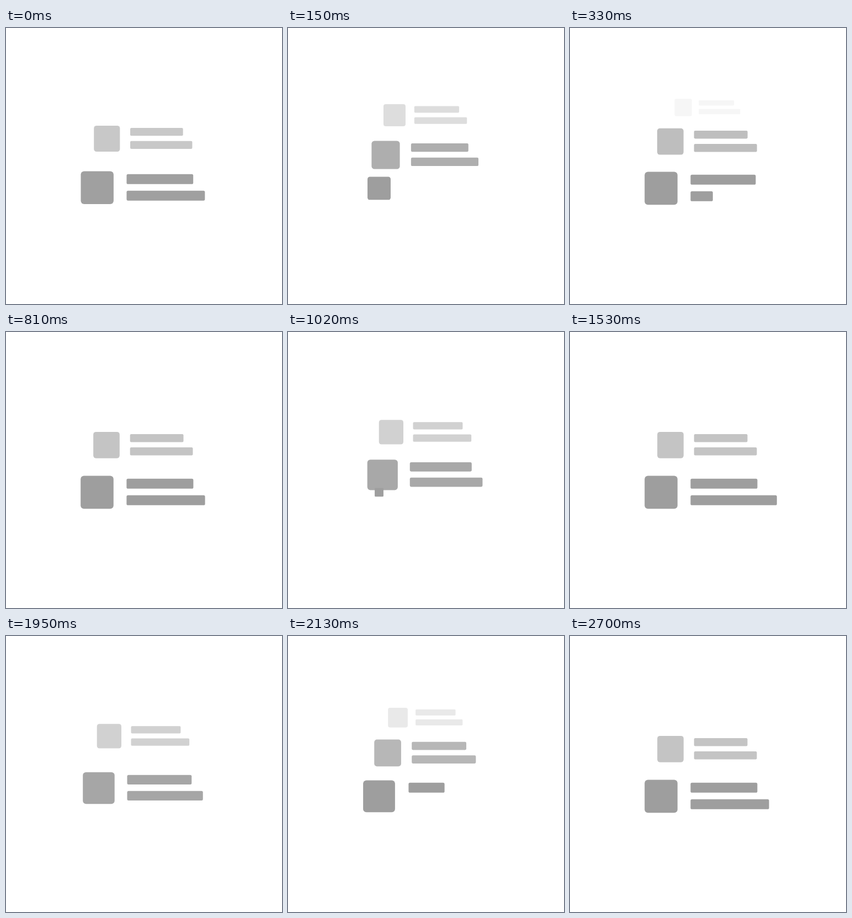
An HTML page that plays this animation: 500 by 500 pixels, repeating every 2.73 s.

```html
<!DOCTYPE html>
<html lang="en">
<head>
<meta charset="utf-8">
<title>List loader</title>
<style>
  html, body { margin: 0; width: 100%; height: 100%; overflow: hidden; background: #fff; }
  svg { display: block; width: 100%; height: 100%; }
</style>
</head>
<body>
<svg id="stage" viewBox="0 0 500 500" fill="#9e9e9e"></svg>
<script>
const LOOP = 2730, STEP = 30, MOVE = 420;
const CX = 250, FRONT_Y = 290.4, MID_Y = 204.8, BACK_Y = 143.3;
const SIZE = 59.6, BAR_X = -31.6, BAR1 = 121, BAR2 = 142.2;
// The three rounds differ in length; the second one sends its back row off later.
const ROUNDS = [
  { start: -30, lag: 0 },
  { start: 900, lag: 30 },
  { start: 1860, lag: 0 },
  { start: 2700, lag: 0 }
];

const clamp = v => Math.min(1, Math.max(0, v));
const mix = (a, b, p) => a + (b - a) * p;

function bezier(x1, y1, x2, y2) {
  const at = (a, b, u) => 3 * a * u * (1 - u) ** 2 + 3 * b * u * u * (1 - u) + u ** 3;
  return x => {
    if (x <= 0 || x >= 1) return clamp(x);
    let lo = 0, hi = 1;
    for (let i = 0; i < 30; i++) {
      const u = (lo + hi) / 2;
      if (at(x1, x2, u) < x) lo = u; else hi = u;
    }
    return at(y1, y2, lo);
  };
}

const stepBack = bezier(0.4, 0, 0.15, 1);
const leave = bezier(0.25, 0.15, 0.2, 1);
const outCubic = p => 1 - (1 - p) ** 3;
const outBack = p => p <= 0 ? 0 : 1 + 2.70158 * (p - 1) ** 3 + 1.70158 * (p - 1) ** 2;

const stage = document.getElementById("stage");
function make(tag, parent) {
  return parent.appendChild(document.createElementNS("http://www.w3.org/2000/svg", tag));
}
function set(el, attrs) {
  for (const k in attrs) el.setAttribute(k, attrs[k]);
}

function makeRow() {
  const g = make("g", stage);
  const box = make("rect", g), bars = [make("rect", g), make("rect", g)];
  bars.forEach((bar, i) => set(bar, { x: BAR_X, y: -24.6 + 30 * i, height: 18, rx: 2.6 }));
  return { g, box, bars };
}

function place(row, y, scale, opacity) {
  set(row.g, { transform: `translate(${CX} ${y}) scale(${scale})`, opacity });
}

function fill(row, box, bar1, bar2) {
  const s = SIZE * box, mid = -114.8 + SIZE / 2;
  set(row.box, { x: mid - s / 2, y: -s / 2, width: s, height: s, rx: 6 * box });
  set(row.bars[0], { width: BAR1 * bar1 });
  set(row.bars[1], { width: BAR2 * bar2 });
}

const fresh = makeRow(), back = makeRow(), middle = makeRow();
fill(back, 1, 1, 1);
fill(middle, 1, 1, 1);

function draw(time) {
  const t = Math.floor(time / STEP) * STEP;
  const round = ROUNDS.filter(r => r.start <= t).pop();
  const e = t - round.start;
  const part = (start, length) => clamp((e - start) / length);

  const m = part(0, MOVE), mp = stepBack(m);
  place(middle, mix(FRONT_Y, MID_Y, mp), mix(1, 0.8, mp), mix(1, 0.6, m));

  const b = part(round.lag, MOVE), shrink = clamp((b - 0.043) / 0.957);
  place(back, mix(MID_Y, BACK_Y, leave(b)), mix(0.8, 0.48, shrink), mix(0.6, 0, b));

  place(fresh, FRONT_Y, 1, 1);
  fill(fresh, outCubic(part(95, 255)), outBack(part(210, 430)), outBack(part(326, 514)));
}

const begin = performance.now();
function tick() {
  draw((performance.now() - begin) % LOOP);
  requestAnimationFrame(tick);
}
draw(0);
requestAnimationFrame(tick);
</script>
</body>
</html>
```
